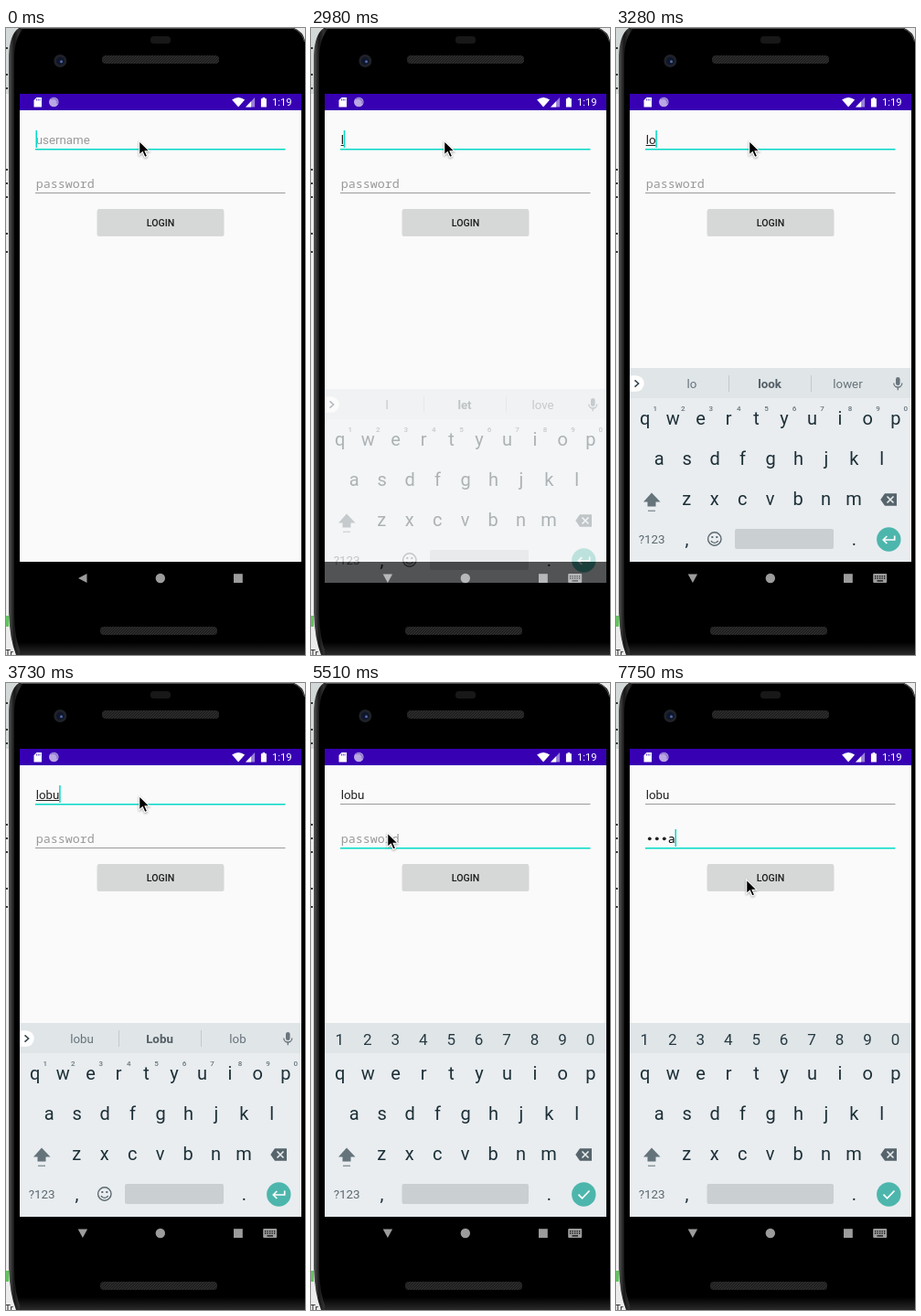
Animation of 327 by 686 pixels, one loop 8 s. Source, as an HTML page:

```html
<!DOCTYPE html>
<html lang="en">
<head>
<meta charset="utf-8">
<title>Login form</title>
<style>
  html, body { margin: 0; width: 100%; height: 100%; overflow: hidden; background: #000; }
  svg { display: block; width: 327px; height: 686px; font-family: Roboto, sans-serif; }
  .mid { text-anchor: middle; }
  .field { font-size: 13.33px; fill: #212121; }
  .hint { fill: #999; }
  .mono { font-family: "Noto Sans Mono", monospace; font-size: 13.33px; }
  .key { font-size: 20px; fill: #1d3038; }
  .digit { font-size: 17px; fill: #263a42; }
  .sup { font-size: 8px; font-weight: 500; fill: #68767d; }
  .word { font-size: 13.3px; fill: #667279; }
  .bold { font-weight: 700; fill: #525e65; }
  .nav { fill: #9c9c9c; }
  #mouse { filter: drop-shadow(0 1px 1px rgba(0, 0, 0, .35)); }
</style>
</head>
<body>
<svg viewBox="0 0 327 686" xmlns="http://www.w3.org/2000/svg">
  <defs>
    <linearGradient id="rim">
      <stop offset="0" stop-color="#555"/>
      <stop offset=".35" stop-color="#161616"/>
      <stop offset=".65" stop-color="#333"/>
      <stop offset="1" stop-color="#000"/>
    </linearGradient>
    <linearGradient id="foot" x2="0" y2="1">
      <stop offset="0" stop-color="#000"/>
      <stop offset="1" stop-color="#2a2a2a"/>
    </linearGradient>
    <pattern id="mesh" width="3" height="3" patternUnits="userSpaceOnUse">
      <rect width="3" height="3" fill="#2b2b2b"/>
      <path d="M0 3L3 0" stroke="#191919"/>
    </pattern>
  </defs>

  <!-- desktop and phone body -->
  <rect width="327" height="686" fill="#ececec"/>
  <rect width="12" height="72" fill="#d3d8d8"/>
  <path d="M0 22h2M0 51h2M0 66h2M0 155h2M0 170h2M0 185h2M0 225h2M0 245h2" stroke="#333" stroke-width="2"/>
  <path d="M0 643h3v12h-3z" fill="#62c45c"/>
  <text x="-1" y="688" font-size="10" fill="#222">Tr</text>
  <path d="M15 0Q5 7 4 30V640Q4 668 12 686H327V14Q325 4 315 0Z" fill="#000"/>
  <path d="M9 672H327V686H12Z" fill="url(#foot)"/>
  <path d="M14 0Q4 7 3 30V640Q4 668 11 686H17Q9 668 9 640V34Q9 10 20 0Z" fill="url(#rim)"/>
  <path d="M16 .4H314Q324 4 326.5 15" fill="none" stroke="#5a5a5a"/>
  <rect x="158" y="9" width="22" height="8" rx="3.5" fill="#181818"/>
  <rect x="105" y="30" width="128" height="9" rx="4" fill="url(#mesh)"/>
  <rect x="103" y="655" width="128" height="9" rx="4" fill="url(#mesh)"/>
  <circle cx="59.3" cy="36" r="7" fill="#1f2229"/>
  <circle cx="59.3" cy="36" r="4.3" fill="#10162a"/>
  <circle cx="60.5" cy="36.7" r="1.5" fill="#5068a8"/>

  <!-- status bar -->
  <rect x="15" y="72" width="308" height="512" fill="#fafafa"/>
  <rect x="15" y="72" width="308" height="18" fill="#3700b3"/>
  <g fill="#fff">
    <path d="M33.5 76H39V86.5H30.5V79Z"/>
    <path d="M33.5 77.5v2M35.3 77.5v2M37.1 77.5v2" stroke="#3700b3" stroke-width=".7"/>
    <circle cx="52.3" cy="81" r="5.3" fill="#b9a6e3"/>
    <path d="M49 78a4.5 4.5 0 0 1 7 5" fill="none" stroke="#8f76cf" stroke-width="1.4"/>
    <g transform="translate(.6 0)">
      <path d="M246.5 78.5Q253.5 73.5 260.5 78.5L253.5 86.5Z"/>
      <path d="M271.5 76V86.5H261.5Z" fill="#9b80d9"/>
      <path d="M267.5 80.2V86.5H261.5Z"/>
      <path d="M278.3 77.2h1.7V76h2.6v1.2h1.7v9.3h-6z"/>
      <text x="290.3" y="85.2" font-size="11.3">1:19</text>
    </g>
  </g>

  <!-- form -->
  <text class="field" id="user" x="32.7" y="127"></text>
  <rect id="compose" x="32.7" y="128" height="1" fill="#212121"/>
  <g id="pass"></g>
  <rect id="userLine" x="32" y="132" width="273.5"/>
  <rect id="passLine" x="32" y="180" width="273.5"/>
  <rect id="caret" width="1.5" height="19" fill="#03dac5"/>
  <rect x="99.5" y="199" width="139" height="29" rx="2" fill="#000" opacity=".13"/>
  <rect x="100" y="198" width="138" height="29" rx="1.5" fill="#d6d7d7"/>
  <text class="mid" x="169" y="216.7" font-size="10.6" font-weight="500" fill="#1c1c1c">LOGIN</text>

  <!-- navigation bar -->
  <path class="nav" id="back"/>
  <circle class="nav" cx="168.8" cy="602" r="5.2"/>
  <rect class="nav" x="249" y="597.2" width="9.8" height="9.8"/>
  <g id="kbIcon">
    <rect class="nav" x="281.2" y="597" width="15" height="10" rx="1"/>
    <path d="M283 599.8h11.5M283 602.2h11.5" stroke="#000" stroke-width="1.2" stroke-dasharray="1.3 1.2"/>
    <path d="M285.5 604.9h6.5" stroke="#000" stroke-width="1.2"/>
  </g>

  <!-- keyboard -->
  <g id="board">
    <rect x="15" y="372" width="308" height="212" fill="#e9edf0"/>
    <rect x="15" y="372" width="308" height="33" fill="#e0e5e8"/>
    <g id="keys"></g>
    <g id="textMode">
      <path d="M15 380.3H22a8.7 8.7 0 0 1 0 17.4H15Z" fill="#fff"/>
      <path d="M20.5 385.3L24.6 389L20.5 392.7" fill="none" stroke="#37474f" stroke-width="1.6"/>
      <path d="M123.5 380v18M213.5 380v18" stroke="#c3c9cc"/>
      <text class="word mid" x="83" y="394"></text>
      <text class="word bold mid" x="168" y="394"></text>
      <text class="word mid" x="253.5" y="394"></text>
      <rect x="306" y="382" width="4.6" height="9" rx="2.3" fill="#68757c"/>
      <path d="M303.8 388.5a4.5 4.5 0 0 0 9 0M308.3 393v3.3" fill="none" stroke="#68757c" stroke-width="1.3"/>
      <g fill="none" stroke="#5a686f" stroke-width="1.4">
        <circle cx="107.8" cy="559" r="7.2"/>
        <path d="M104 561a4.2 4.2 0 0 0 7.6 0"/>
      </g>
      <path d="M105.3 556v2M110.3 556v2" stroke="#5a686f" stroke-width="1.9"/>
      <g id="sups"></g>
    </g>
    <g id="digits"></g>
    <path d="M39 508.5L48.5 518.5H43.5V523.5H34.5V518.5H30Z" fill="#65737a"/>
    <path d="M35 528.3h8" stroke="#8b979d" stroke-width="1.5"/>
    <path d="M289.3 516L294 509.2H307V522.8H294Z" fill="#56646b"/>
    <path d="M296.5 512.5l7 7m0-7l-7 7" stroke="#e9edf0" stroke-width="1.6"/>
    <text class="mid" x="39.2" y="563.7" font-size="13.4" fill="#5a686f">?123</text>
    <text class="key mid" x="77.5" y="566">,</text>
    <text class="key mid" x="260.5" y="566">.</text>
    <rect id="space" y="548" height="22" rx="2" fill="#cacfd2"/>
    <circle cx="298.3" cy="559.5" r="13.2" fill="#4db6ac"/>
    <path id="action" fill="none" stroke="#fff" stroke-width="1.7"/>
  </g>

  <path id="mouse" d="M.7 0V15.5L4.3 12.2L6.9 18L9.6 16.8L7.1 11.2H11.9Z" fill="#000" stroke="#fff" stroke-width="1.1"/>
</svg>

<script>
const LOOP = 8000;
const $ = id => document.getElementById(id);
const label = (cls, x, y, s) => `<text class="${cls}" x="${x}" y="${y}">${s}</text>`;
const show = (id, on) => $(id).setAttribute("display", on ? "inline" : "none");
const set = (id, attrs) => {
  for (const k in attrs) $(id).setAttribute(k, attrs[k]);
};

const row = (chars, x, y, cls = "key mid") =>
  [...chars].map((c, i) => label(cls, x + i * 30.45, y, c)).join("");

$("keys").innerHTML = row("qwertyuiop", 31.7, 433.7) + row("asdfghjkl", 47.2, 478) + row("zxcvbnm", 77.3, 522);
$("sups").innerHTML = row("1234567890", 42.8, 419, "sup mid");
$("digits").innerHTML = row("1234567890", 31.4, 396, "digit mid");
const words = document.querySelectorAll(".word");

// Each step patches the state left by the steps before it.
const steps = [
  [0, { caret: 1, user: "", pass: "", focus: "user", mouse: [145, 123.5], alpha: 0, drop: 0, digits: 0, words: ["l", "let", "love"] }],
  [440, { caret: 0 }],
  [890, { caret: 1 }],
  [1340, { caret: 0 }],
  [1940, { caret: 1 }],
  [2390, { caret: 0 }],
  [2830, { caret: 1 }],
  [2980, { user: "l", alpha: .35, drop: 23 }],
  [3130, { alpha: .84, drop: 10.5 }],
  [3280, { user: "lo", alpha: 1, drop: 0, words: ["lo", "look", "lower"] }],
  [3430, { user: "lob", words: ["lob", "lobby", "lobe"] }],
  [3730, { user: "lobu", words: ["lobu", "Lobu", "lob"] }],
  [4170, { caret: 0 }],
  [4320, { mouse: [138, 128] }],
  [4470, { mouse: [110, 147] }],
  [4610, { mouse: [88, 161] }],
  [4760, { mouse: [84, 164] }],
  [4910, { mouse: [83, 164], focus: "pass", caret: 1 }],
  [5060, { digits: 1 }],
  [5510, { caret: 0 }],
  [6110, { caret: 1 }],
  [6260, { pass: "d" }],
  [6400, { pass: "do" }],
  [6550, { pass: "dof" }],
  [6850, { pass: "dofa" }],
  [7300, { caret: 0 }],
  [7450, { mouse: [95, 176] }],
  [7600, { mouse: [130, 206] }],
  [7750, { mouse: [142, 215], caret: 1 }]
];

function drawPassword(text) {
  if (!text) return label("mono hint", 32.7, 175, "password");
  const last = text.length - 1;
  let out = "";
  for (let i = 0; i < last; i++) out += `<circle cx="${36.8 + i * 8}" cy="170.3" r="1.9" fill="#212121"/>`;
  return out + label("mono", 32.7 + last * 8, 175, text[last]);
}

function drawLine(id, on) {
  set(id, { height: on ? 1.5 : 1, fill: on ? "#03dac5" : "#9b9b9b" });
}

function draw(s) {
  const onUser = s.focus === "user";
  const user = $("user");
  user.textContent = s.user || "username";
  user.classList.toggle("hint", !s.user);
  const typed = s.user ? user.getComputedTextLength() : 0;
  set("compose", { width: onUser ? typed : 0 });
  $("pass").innerHTML = drawPassword(s.pass);
  drawLine("userLine", onUser);
  drawLine("passLine", !onUser);
  set("caret", { x: 32.5 + (onUser ? typed : s.pass.length * 8), y: onUser ? 112 : 160 });
  show("caret", s.caret);

  const open = s.alpha > 0;
  show("kbIcon", open);
  set("back", { d: open ? "M78.7 597.5H89.1L83.9 607Z" : "M79 602L88.5 597V607Z" });
  set("board", { opacity: s.alpha, transform: `translate(0 ${s.drop})` });
  show("textMode", !s.digits);
  show("digits", s.digits);
  words.forEach((w, i) => { w.textContent = s.words[i]; });
  const left = s.digits ? 99.5 : 130;
  set("space", { x: left, width: 238 - left });
  set("action", {
    d: s.digits ? "M292.5 559.7L296.6 563.8L304.5 555.5"
                : "M304.7 555.5V560H292.5M296.3 556L292.3 560L296.3 564"
  });
  set("mouse", { transform: `translate(${s.mouse})` });
}

let shown = -1;
function tick() {
  const t = performance.now() % LOOP;
  const past = steps.filter(([at]) => at <= t);
  if (past.length !== shown) {
    shown = past.length;
    draw(Object.assign({}, ...past.map(([, patch]) => patch)));
  }
  requestAnimationFrame(tick);
}
tick();
</script>
</body>
</html>
```
